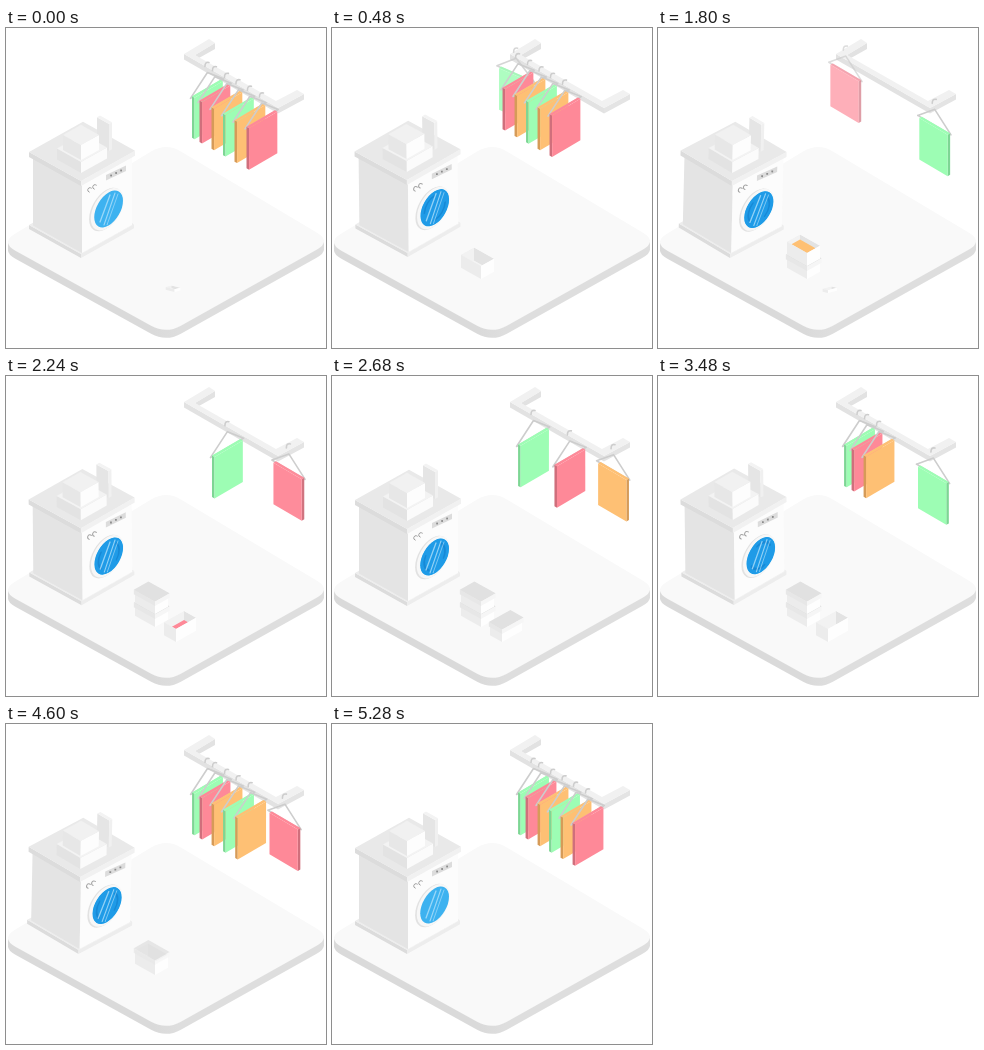
An HTML page with a canvas for the animation above (5320 ms loop, 320 by 320 pixels).

```html
<!DOCTYPE html>
<html lang="en">
<head>
<meta charset="utf-8">
<title>Laundry</title>
<style>
  html, body { margin: 0; width: 100%; height: 100%; overflow: hidden; background: #fff; }
  canvas { display: block; width: 100vw; height: 100vh; }
</style>
</head>
<body>
<canvas id="stage"></canvas>
<script>
const LOOP = 5320, SIZE = 320, SLOPE = 0.56;
const canvas = document.getElementById('stage');
const scale = Math.max(1, window.devicePixelRatio || 1);
canvas.width = canvas.height = SIZE * scale;
const c = canvas.getContext('2d');

const clamp = v => Math.max(0, Math.min(1, v));
const part = (t, a, b) => clamp((t - a) / (b - a));
const mix = (a, b, k) => a + (b - a) * k;
const smooth = k => (1 - Math.cos(Math.PI * k)) / 2;

function track(steps, t) {
  for (let i = 1; i < steps.length; i++) {
    const [t0, v0] = steps[i - 1], [t1, v1] = steps[i];
    if (t <= t1) return mix(v0, v1, smooth(part(t, t0, t1)));
  }
  return steps[steps.length - 1][1];
}

function poly(color, ...p) {
  c.fillStyle = color;
  c.beginPath();
  for (let i = 0; i < p.length; i += 2) c.lineTo(p[i], p[i + 1]);
  c.closePath();
  c.fill();
}

function stroke(color, width, ...p) {
  c.strokeStyle = color;
  c.lineWidth = width;
  c.beginPath();
  for (let i = 0; i < p.length; i += 2) c.lineTo(p[i], p[i + 1]);
  c.stroke();
}

// Isometric block standing on its front bottom corner.
function block(x, y, wl, wr, h, top, left, right) {
  const l = wl * SLOPE, r = wr * SLOPE, f = y - h;
  poly(left, x, y, x - wl, y - l, x - wl, f - l, x, f);
  poly(right, x, y, x + wr, y - r, x + wr, f - r, x, f);
  if (top) poly(top, x, f, x - wl, f - l, x - wl + wr, f - l - r, x + wr, f - r);
}

function floorPath(dy) {
  const v = [[-5.5, 214.5], [160, 114.5], [325.5, 213.5], [160, 306]], k = 0.09;
  c.beginPath();
  v.forEach((p, i) => {
    const a = v[(i + 3) % 4], b = v[(i + 1) % 4];
    c.lineTo(mix(p[0], a[0], k), mix(p[1], a[1], k) + dy);
    c.quadraticCurveTo(p[0], p[1] + dy, mix(p[0], b[0], k), mix(p[1], b[1], k) + dy);
  });
  c.closePath();
}

function drawFloor() {
  const side = c.createLinearGradient(0, 0, SIZE, 0);
  side.addColorStop(0.46, '#dadada');
  side.addColorStop(0.54, '#dedede');
  c.fillStyle = side;
  for (let d = 8; d > 0; d -= 2) { floorPath(d); c.fill(); }
  c.fillStyle = '#f9f9f9';
  floorPath(0);
  c.fill();
}

// Washing machine
const TILT = [[0, 0], [300, 1.4], [600, -1.7], [1120, -1.7], [1800, 1.4], [2240, -0.5],
  [2680, 0], [3100, 1.3], [3480, -0.7], [3800, -0.5], [4000, 0], [4300, 1.4],
  [4750, 1.1], [5060, 0], [LOOP, 0]];

function disc(x, y, r, color) {
  c.save();
  c.transform(0.866, -0.5, 0, 1, x, y);
  c.beginPath();
  c.arc(0, 0, r, 0, 7);
  c.restore();
  if (color) { c.fillStyle = color; c.fill(); }
}

function drawDoor(t) {
  disc(100, 181.5, 19.5, '#e2e2e2');
  disc(101.2, 181.2, 19, '#f7f7f7');
  c.save();
  disc(102.6, 181, 16.6, '#3db2f0');
  c.clip();
  c.globalAlpha = part(t, 80, 500) * (1 - part(t, 5060, 5270));
  disc(102.6, 181, 16.6, '#1f9be7');
  c.save();
  c.transform(0.866, -0.5, 0, 1, 102.6, 181);
  c.strokeStyle = '#1789d6';
  c.lineWidth = 2;
  for (const side of [0, Math.PI]) {
    const a = t / 150 + side;
    c.beginPath();
    c.arc(0, 0, 12, a, a + 1.5);
    c.stroke();
  }
  c.restore();
  c.globalAlpha = 0.75;
  stroke('#b7e3fb', 1.3, 94, 194, 104, 167);
  stroke('#b7e3fb', 1.1, 98, 197, 109, 165);
  stroke('#b7e3fb', 0.8, 101, 197, 112, 166);
  c.restore();
}

function drawWasher(t) {
  c.save();
  const a = track(TILT, t);
  c.translate(76 - Math.max(0, a), 165 + Math.min(0, a) * 1.5);
  c.rotate(a * Math.PI / 180);
  c.translate(-76, -165);

  block(75, 230, 52, 53, 4, '#ededed', '#dcdcdc', '#ededed');
  block(76, 225, 49, 50, 71, null, '#e4e4e4', '#fcfcfc');
  block(75, 158, 52, 54, 5, '#e9e9e9', '#dcdcdc', '#f1f1f1');

  block(103, 123, 12, 3, 27, '#f3f3f3', '#e5e5e5', '#f0f0f0');
  block(75, 145, 24, 26, 11, '#f3f3f3', '#e3e3e3', '#fbfbfb');
  block(75, 132, 18, 18, 15, '#f1f1f1', '#e7e7e7', '#fdfdfd');

  poly('#dcdcdc', 100, 147, 120, 137.5, 120, 143, 100, 152.5);
  for (let i = 0; i < 3; i++) {
    c.fillStyle = '#8c8c8c';
    c.fillRect(104.2 + i * 5, 146.6 - i * 2.5, 1.8, 1.8);
  }
  for (const [x, y] of [[84, 162], [89, 159]]) {
    c.strokeStyle = '#a2a2a2';
    c.lineWidth = 1;
    c.beginPath();
    c.arc(x, y, 2.3, 1.9, 5.4);
    c.stroke();
  }
  drawDoor(t);
  c.restore();
}

// Rail and clothes
function drawRail() {
  poly('#e2e2e2', 189, 27, 209, 15, 209, 21, 193, 30);
  poly('#e2e2e2', 178, 26, 272, 80, 272, 85.5, 178, 31.5);
  poly('#e4e4e4', 272, 80, 298, 66, 298, 71.5, 272, 85.5);
  poly('#f1f1f1', 178, 26, 203, 11, 209, 15, 189, 27, 270, 73, 291, 62, 298, 66, 272, 80);
}

const GREEN = ['#9dfdb4', '#7dd694'], RED = ['#fe8998', '#d06f7c'], ORANGE = ['#fec074', '#d69b58'];
// colours, resting place, entry time
const CLOTHES = [
  [GREEN, 201.5, 1615], [RED, 209, 2125], [ORANGE, 221, 2550],
  [GREEN, 232.5, 3280], [ORANGE, 244, 3818], [RED, 256, 4440]
];
const LEFT = 180, RIGHT = 272, ARM = 240;
const SLIDE = 45.5, EASE = 0.93; // distance in the first second, slowing a little
const barY = x => 78 - (RIGHT - x) * SLOPE;

function leaving(rest, t) {
  const corner = 1000 * ((rest - LEFT) / SLIDE) ** (1 / EASE);
  const d = (t - corner) * 0.12;
  if (d > 24) return null;
  const turn = smooth(part(t, corner - 30, corner + 50));
  if (d < 0) {
    const x = rest - SLIDE * (t / 1000) ** EASE;
    return { x, y: barY(x), turn, alpha: 1 };
  }
  return { x: LEFT + d, y: barY(LEFT) - d * SLOPE, turn, alpha: 1 - part(d, 0, 24) };
}

function entering(rest, start, t) {
  if (t < start) return null;
  const corner = start + ARM, alpha = part(t, start, start + 120);
  const turn = 1 - smooth(part(t, corner - 10, corner + 150));
  if (t < corner) {
    const x = mix(293, RIGHT, (t - start) / ARM);
    return { x, y: 78 - (x - RIGHT) * SLOPE, turn, alpha };
  }
  const x = mix(RIGHT, rest, smooth(part(t, corner, corner + 600)));
  return { x, y: barY(x), turn, alpha };
}

function drawGarment([face, edge], { x, y, turn, alpha }) {
  const a = mix(-Math.PI / 4, Math.PI / 4, turn);
  const ux = 20 * Math.cos(a), uy = 11.7 * Math.sin(a);
  const dx = 3.6 * Math.sin(a), dy = -2 * Math.cos(a);
  const cx = x - dx * 0.5, top = y + 23, h = 41.5;
  c.globalAlpha = alpha;

  // The neck of the hanger is hidden behind the rail.
  c.strokeStyle = '#cdcdcd';
  c.lineWidth = 1.6;
  c.beginPath();
  c.moveTo(x - 2.5, y);
  c.quadraticCurveTo(x - 2.5, y - 5, x + 1.5, y - 4);
  c.stroke();
  stroke('#cdcdcd', 1.6, x - ux * 1.2, top - uy * 1.2 - 1, x, y + 6,
    x + ux * 1.15, top + uy * 1.15 - 1, x - ux * 1.2, top - uy * 1.2 - 1);

  const end = a < 0 ? -1 : 1, ex = cx + ux * end, ey = top + uy * end;
  poly(edge, ex, ey, ex + dx, ey + dy, ex + dx, ey + dy + h, ex, ey + h);
  poly(face, cx - ux, top - uy, cx - ux + dx, top - uy + dy,
    cx + ux + dx, top + uy + dy, cx + ux, top + uy);
  poly(face, cx - ux, top - uy, cx + ux, top + uy, cx + ux, top + uy + h, cx - ux, top - uy + h);
  c.globalAlpha = 1;
}

function drawClothes(t) {
  for (const [colors, rest, start] of CLOTHES) {
    const pose = entering(rest, start, t) || leaving(rest, t);
    if (pose) drawGarment(colors, pose);
  }
}

// Storage boxes: front corner, left and right width, then the phases
const SPAWN = [170, 265];
const BOXES = [
  { at: [149, 251], size: [20, 13], grow: [-80, 400], fill: [560, 900], close: [1080, 1280],
    open: [4560, 4700], shrink: [4820, 5030], color: GREEN[0] },
  { at: [149, 238], size: [20, 13], grow: [1160, 1480], fill: [1520, 1720], close: [1880, 2080],
    open: [4010, 4160], shrink: [4340, 4530], color: ORANGE[0] },
  { at: [170, 266], size: [12, 20], grow: [1740, 2080], fill: [2130, 2350], close: [2400, 2600],
    open: [3220, 3400], shrink: [3600, 3860], color: RED[0] }
];

function drawBox(b, t) {
  if (t < b.grow[0] || t >= b.shrink[1]) return;
  const g = smooth(part(t, ...b.grow)), left = 1 - smooth(part(t, ...b.shrink));
  const shut = smooth(part(t, ...b.close)) * (1 - smooth(part(t, ...b.open)));
  const full = t < b.open[0] ? part(t, ...b.fill) : 0;

  c.save();
  c.translate(mix(SPAWN[0], b.at[0], g), mix(SPAWN[1], b.at[1], g));
  c.scale(mix(0.4, 1, g) * left, mix(0.15, 1, g) * left);
  const [wl, wr] = b.size, h = 13, l = wl * SLOPE, r = wr * SLOPE;
  const bx = wr - wl, by = -h - l - r;

  c.save();
  c.beginPath();
  c.moveTo(0, -h);
  c.lineTo(-wl, -h - l);
  c.lineTo(bx, by);
  c.lineTo(wr, -h - r);
  c.closePath();
  c.fillStyle = '#f4f4f4';
  c.fill();
  c.clip();
  poly('#f2f2f2', -wl, -h - l, bx, by, bx, by + h, -wl, -l);
  poly('#e3e3e3', bx, by, wr, -h - r, wr, -r, bx, by + h);
  if (full) {
    const y = mix(0, -8, full);
    c.globalAlpha = clamp(full * 3);
    poly(b.color, 0, y, -wl, y - l, bx, y - l - r, wr, y - r);
    c.globalAlpha = 1;
  }
  c.restore();

  block(0, 0, wl, wr, h, null, '#ececec', '#fefefe');
  if (shut > 0) {
    c.globalAlpha = shut;
    block(0, -8 - (1 - shut) * 12, wl + 1.2, wr + 1.6, 4.5, '#e1e1e1', '#e7e7e7', '#f6f6f6');
  }
  c.restore();
}

function draw(t) {
  c.setTransform(scale, 0, 0, scale, 0, 0);
  c.globalAlpha = 1;
  c.lineJoin = c.lineCap = 'round';
  c.fillStyle = '#fff';
  c.fillRect(0, 0, SIZE, SIZE);
  drawFloor();
  drawWasher(t);
  for (const b of BOXES) drawBox(b, t);
  drawRail();
  drawClothes(t);
}

const begin = performance.now();
function tick() {
  draw((performance.now() - begin) % LOOP);
  requestAnimationFrame(tick);
}
tick();
</script>
</body>
</html>
```
